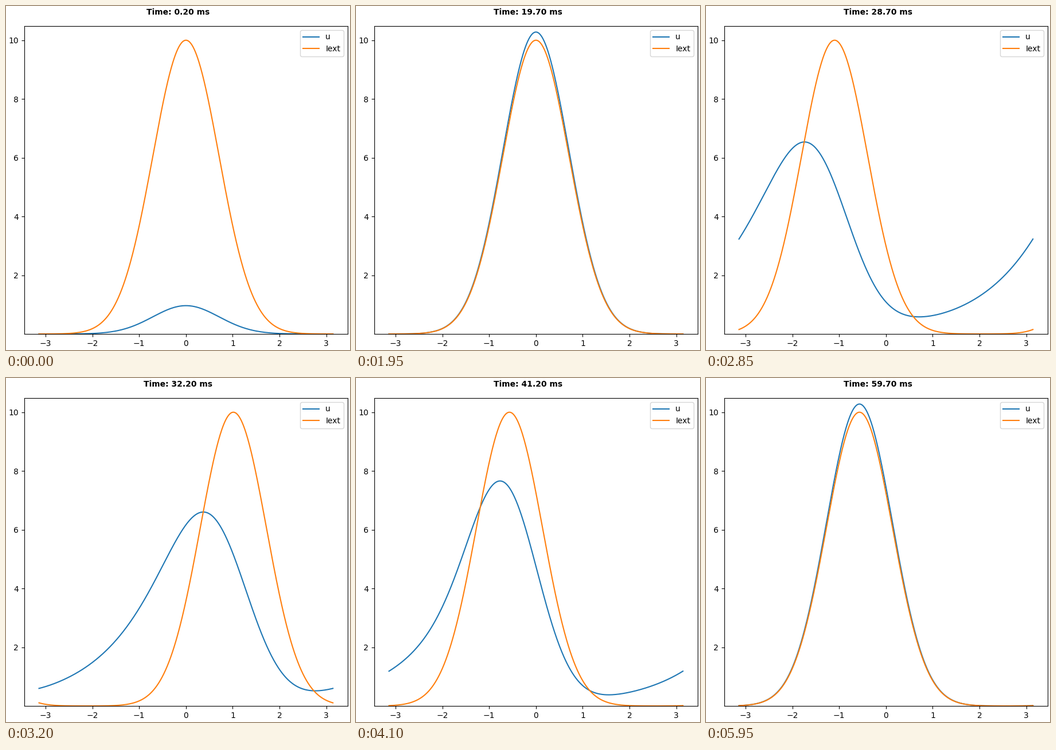
These frames come from a looping animation (600 px wide and 600 px high, 6000 ms). A matplotlib script:

```python
import numpy as np
import matplotlib.pyplot as plt
from matplotlib.animation import FuncAnimation

# Ring attractor network tracking a moving bump of input
NUM, TAU, DT = 512, 2.0, 0.1
K, WIDTH, AMP, J0 = 8.1, 0.5, 10.0, 4.0
PHASE = 200   # steps in each phase: hold, move, hold
STRIDE = 5    # simulation steps per animation frame
SIZE = 600

x = np.linspace(-np.pi, np.pi, NUM)


def ring(d):
    """Signed distance on the circle."""
    d = np.remainder(d, 2 * np.pi)
    return np.where(d > np.pi, d - 2 * np.pi, d)


def simulate(stimulus):
    d = ring(x[:, None] - x[None, :])
    conn = J0 * np.exp(-0.5 * (d / WIDTH) ** 2) / (np.sqrt(2 * np.pi) * WIDTH)
    decay = np.exp(-DT / TAU)
    u = np.zeros(NUM)
    history = []
    for drive in stimulus:
        rate = u ** 2 / (1 + K * np.sum(u ** 2))
        u = u * decay + (conn @ rate + drive) * (1 - decay)
        history.append(u)
    return np.array(history)


position = np.concatenate([np.zeros(PHASE),
                           np.linspace(0, 12, PHASE),
                           np.full(PHASE, 12.0)])
stimulus = AMP * np.exp(-0.25 * (ring(x - position[:, None]) / WIDTH) ** 2)
activity = simulate(stimulus)

fig = plt.figure(figsize=(6, 6), dpi=100)
left, right, top, bottom = 31.9, 595.83, 34.9, 572.1
ax = fig.add_axes([left / SIZE, 1 - bottom / SIZE,
                   (right - left) / SIZE, (bottom - top) / SIZE])
u_line, = ax.plot(x, activity[1], label='u')
i_line, = ax.plot(x, stimulus[1], label='Iext')
ax.set_xlim(-1.1 * np.pi, 1.1 * np.pi)
ax.set_ylim(0.98 * min(activity.min(), stimulus.min()),
            1.02 * max(activity.max(), stimulus.max()))
ax.legend(loc='best')
title = fig.suptitle('', y=1 - 4.17 / SIZE, fontsize=10, fontweight='bold')


def update(i):
    step = 1 + STRIDE * i
    u_line.set_ydata(activity[step])
    i_line.set_ydata(stimulus[step])
    title.set_text(f'Time: {(step + 1) * DT:.2f} ms')
    return u_line, i_line, title


anim = FuncAnimation(fig, update, frames=3 * PHASE // STRIDE, interval=50,
                     repeat=True, repeat_delay=0, blit=False)
plt.show()
```
